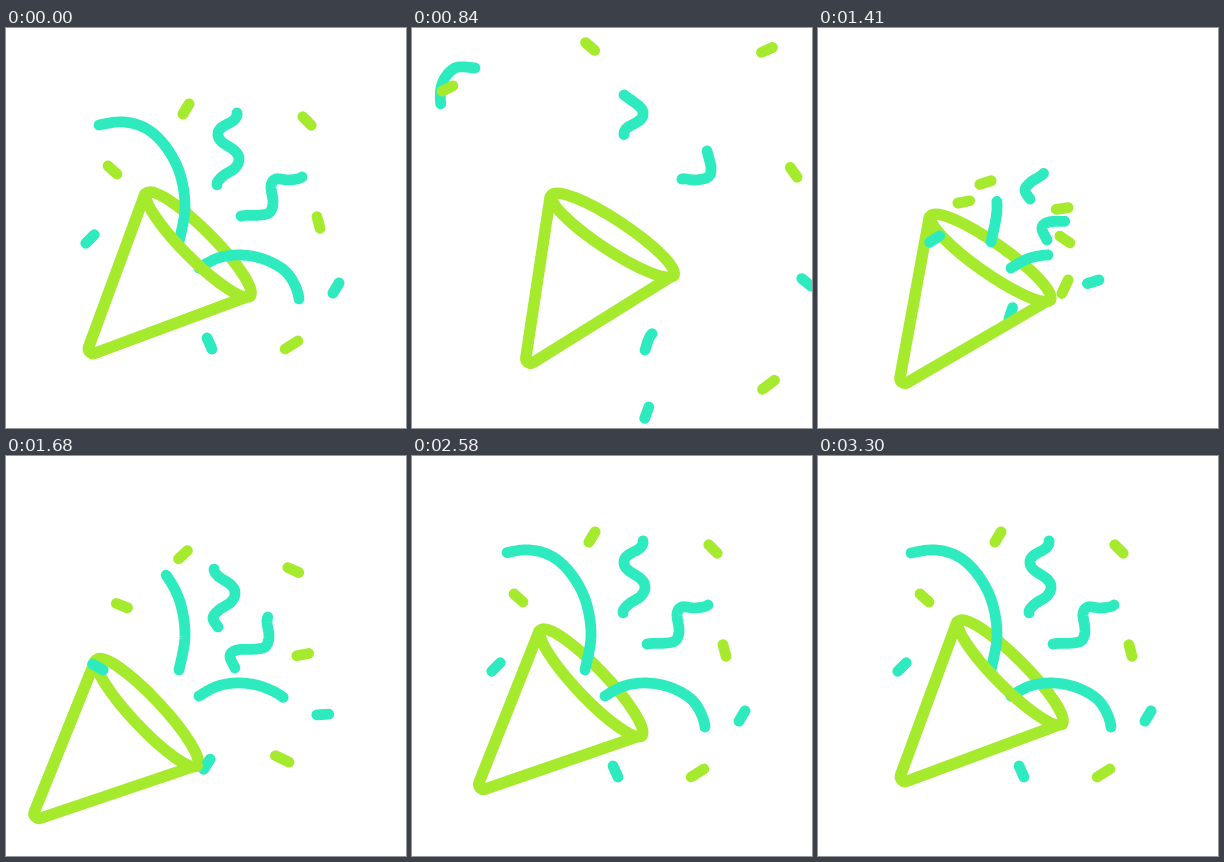
An HTML page with a canvas for the animation above (3.33 s loop, 400 by 400 pixels).

```html
<!DOCTYPE html>
<html lang="en">
<head>
<meta charset="utf-8">
<title>Party popper</title>
<style>
  html, body { margin: 0; width: 100%; height: 100%; overflow: hidden; background: #fff; }
  canvas { display: block; width: 400px; height: 400px; }
</style>
</head>
<body>
<canvas id="stage" width="400" height="400"></canvas>
<script>
const ctx = document.getElementById('stage').getContext('2d');
const GREEN = '#a5ea2d', TEAL = '#2eeabf';
const LOOP = 3330, STEP = 30, BURST = 1200;

const clamp = x => Math.min(1, Math.max(0, x));
const span = (t, a, b) => clamp((t - a) / (b - a));
const mix = (a, b, k) => a + (b - a) * k;
const smooth = x => x * x * (3 - 2 * x);
const left = (x, power) => Math.pow(1 - x, power);

// cubic-bezier(.333, 0, c, 1): the smaller c, the longer the settling
function ease(x, c) {
  let lo = 0, hi = 1;
  for (let i = 0; i < 20; i++) {
    const u = (lo + hi) / 2, v = 1 - u;
    if (v * v * u + 3 * c * v * u * u + u * u * u < x) lo = u; else hi = u;
  }
  return smooth((lo + hi) / 2);
}
const settle = x => ease(x, 0.37);
const pop = x => ease(x, 0.04);

// Ribbons crawl along a path; rest is the visible span in point indices.
const ribbons = [
  { pts: [[173,214],[179,180],[174,146],[160,119],[141,101],[118,94],[93,97],[58,106],[35,96],[29,79],[30,56],[43,40],[63,40]],
    rest: [0, 6], tail: [0, 1230], power: 2.1, grow: 1500, drift: 0 },
  { pts: [[193,240],[212,230],[235,227],[260,232],[282,246],[293,271],[287,295],[262,302],[241,305],[233,322]],
    rest: [0, 5], tail: [0, 1050], power: 4.2, grow: 1500, drift: 0 },
  { pts: [[216,165],[211,156],[217,148],[229,140],[233,131],[229,123],[216,114],[212,107],[215,100],[228,92],[231,85],[227,78],[212,67]],
    rest: [0.9, 10], tail: [400, 1220], power: 2.5, grow: 1100, drift: 1 },
  { pts: [[233,206],[228,194],[235,188],[255,187],[264,184],[267,174],[265,158],[270,151],[283,152],[296,149],[299,140],[295,123]],
    rest: [2, 9], tail: [400, 1220], power: 2.5, grow: 1100, drift: 1 }
];

// at/angle: rest pose; fly and spin: way out (angle at 840 and 1230 ms); from and twist: burst start
const dashes = [
  { color: GREEN, at: [180,81], angle: 121, fly: [-2,-66], spin: [-80,-162], gone: 1250, from: [162,187], twist: 47, start: 1260 },
  { color: GREEN, at: [106.5,142], angle: 42, fly: [-75,-86], spin: [-68,-99], gone: 1150, from: [163,188], twist: -60, start: 1230 },
  { color: GREEN, at: [301,93], angle: 45, fly: [57,-75], spin: [-69,-101], gone: 1250, from: [219,219], twist: -60, start: 1260 },
  { color: GREEN, at: [312.5,194.5], angle: 75, fly: [73,-53], spin: [-20,-29], gone: 1060, from: [218,219], twist: -250, start: 1230 },
  { color: GREEN, at: [285.5,317], angle: -32, half: 7.5, fly: [75,42], spin: [-5,-8], gone: 1180, from: [230,233], twist: 167, start: 1230 },
  { color: TEAL, at: [203.5,315.5], angle: 66, fly: [33,73], spin: [44,64], gone: 1180, from: [188,272], twist: -360, start: 1260 },
  { color: TEAL, at: [330,260], angle: 121, fly: [68,-6], spin: [-82,-120], gone: 1060, from: [251,251], twist: -360, start: 1260 },
  { color: TEAL, at: [84,211], angle: -45, fly: [-95,-8], spin: [-70,-100], gone: 780, from: [131,211], twist: 217, start: 1260 }
];

function pointOn(pts, u) {
  const i = Math.min(pts.length - 2, Math.floor(u)), f = u - i;
  const p = k => pts[Math.min(pts.length - 1, Math.max(0, i + k))];
  const [a, b, c, d] = [p(-1), p(0), p(1), p(2)];
  return [0, 1].map(n => b[n] + 0.5 * f * (c[n] - a[n] +
    f * (2 * a[n] - 5 * b[n] + 4 * c[n] - d[n] + f * (3 * (b[n] - c[n]) + d[n] - a[n]))));
}

function drawRibbon(r, t) {
  const last = r.pts.length - 1;
  let tail, head, lag = 0;
  if (t < 1230) {
    tail = mix(r.rest[0], last, smooth(span(t, ...r.tail)));
    head = mix(r.rest[1], last, smooth(span(t, 0, 840)));
  } else {
    const rem = left(span(t, 1260, 1260 + r.grow), r.power);
    head = r.rest[1] * (1 - rem);
    tail = r.rest[0] * smooth(span(t, 1640, 2200));
    lag = r.drift * Math.min(1, rem / 0.3);
  }
  if (head - tail < 0.01) return;
  ctx.strokeStyle = TEAL;
  ctx.beginPath();
  for (let i = 0; i <= 80; i++) {
    const [x, y] = pointOn(r.pts, mix(tail, head, i / 80));
    ctx.lineTo(x - 4 * lag, y + 6 * lag);
  }
  ctx.stroke();
}

function drawDash(d, t) {
  let [x, y] = d.at, angle = d.angle;
  if (t < d.gone) {
    const k = pop(span(t, 0, 1260));
    x += d.fly[0] * k;
    y += d.fly[1] * k;
    angle += t < 840 ? d.spin[0] * t / 840 : mix(d.spin[0], d.spin[1], (t - 840) / 390);
  } else if (t >= d.start) {
    const k = pop(span(t, BURST, BURST + 1015));
    x = mix(d.from[0], x, k);
    y = mix(d.from[1], y, k);
    angle += d.twist * (1 - pop(span(t, BURST, BURST + 1440)));
  } else return;
  const a = angle * Math.PI / 180, half = d.half || 6;
  const dx = half * Math.cos(a), dy = half * Math.sin(a);
  ctx.strokeStyle = d.color;
  ctx.beginPath();
  ctx.moveTo(x - dx, y - dy);
  ctx.lineTo(x + dx, y + dy);
  ctx.stroke();
}

function conePose(t) {
  const recoil = t < 1700 ? smooth(span(t, 1087, 1700)) : 1 - settle(span(t, 1700, 3300));
  const tilt = t < 1200 ? -14.8 * smooth(t / 1200)
    : t < 1840 ? mix(-14.8, 4.8, smooth(span(t, 1200, 1840)))
    : 4.8 * (1 - settle(span(t, 1840, 3300)));
  return { x: -50 * recoil, y: 39 * recoil, tilt: tilt * Math.PI / 180 };
}

function drawCone(pose, front) {
  ctx.save();
  ctx.translate(151 + pose.x, 171 + pose.y);
  ctx.rotate(pose.tilt);
  ctx.translate(-151, -171);
  ctx.strokeStyle = GREEN;
  ctx.lineWidth = 11.5;
  ctx.beginPath();
  ctx.ellipse(192.5, 216.5, 73, 15, Math.PI / 4, front ? 0 : Math.PI, front ? Math.PI : Math.PI * 2);
  if (front) {
    ctx.moveTo(139, 166);
    ctx.arcTo(79, 329, 243, 268, 5);
    ctx.lineTo(243, 268);
  }
  ctx.stroke();
  ctx.restore();
}

function draw(t) {
  ctx.fillStyle = '#fff';
  ctx.fillRect(0, 0, 400, 400);
  ctx.lineWidth = 10.8;
  ctx.lineCap = ctx.lineJoin = 'round';
  const pose = conePose(t);
  drawCone(pose, false);
  ribbons.forEach(r => drawRibbon(r, t));
  dashes.slice(0, -1).forEach(d => drawDash(d, t));
  drawCone(pose, true);
  drawDash(dashes[dashes.length - 1], t);
}

const begin = performance.now();
function tick() {
  const t = (performance.now() - begin) % LOOP;
  draw(Math.floor(t / STEP) * STEP);
  requestAnimationFrame(tick);
}
tick();
</script>
</body>
</html>
```
